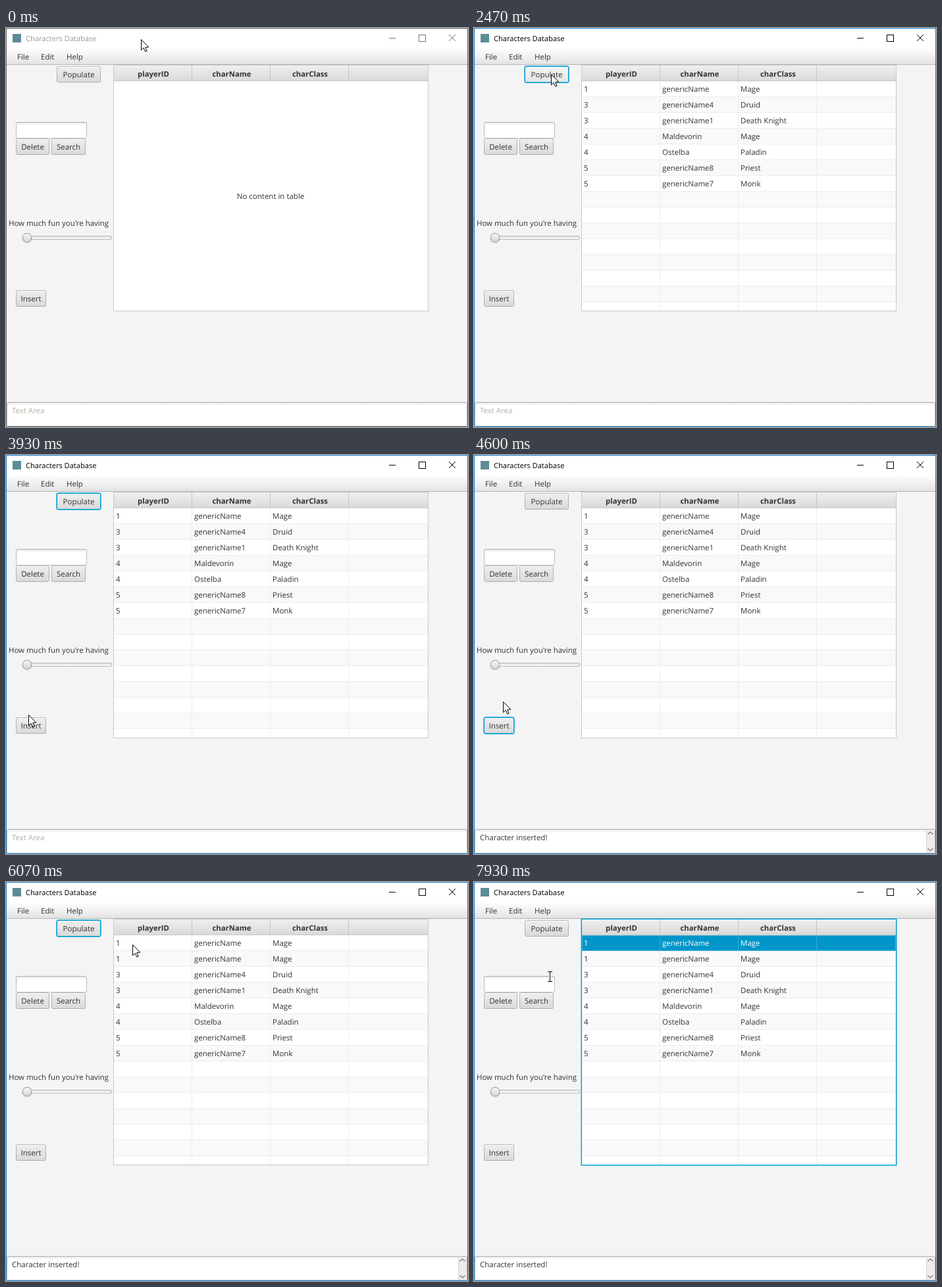
These frames come from a looping animation (702x607 px, 8000 ms). An HTML page with a canvas:

```html
<!DOCTYPE html>
<html lang="en">
<head>
<meta charset="utf-8">
<title>Characters Database</title>
<style>
html, body { margin: 0; width: 100%; height: 100%; overflow: hidden; background: #f4f4f4; }
canvas { display: block; }
</style>
</head>
<body>
<canvas id="stage" width="702" height="607"></canvas>
<script>
const ctx = document.getElementById('stage').getContext('2d');
const LOOP = 8000, TICK = 1000 / 15;
const BLUE = '#039ed3', INK = '#333';

// Ticks at which the state changes
const AT = { press1: 26, fill1: 28, insert: 63, inserted: 65, message: 68, press2: 83, fill2: 84, select: 114 };

// Pointer path: tick, x, y
const PATH = [
  [0, 205, 17], [2, 205, 17], [9, 91, 60], [12, 115, 71], [18, 115, 71], [19, 115, 70],
  [32, 115, 70], [33, 116, 70], [36, 116, 70], [37, 117, 70], [43, 314, 96], [49, 100, 123],
  [56, 28, 355], [59, 34, 395], [62, 36, 411], [67, 36, 411], [77, 117, 68], [79, 119, 75],
  [86, 119, 75], [91, 192, 95], [99, 330, 99], [101, 333, 98], [108, 333, 98], [110, 325, 95],
  [115, 325, 95], [119, 115, 144]
];

const ROWS = [
  ['1', 'genericName', 'Mage'], ['1', 'genericName', 'Mage'], ['3', 'genericName4', 'Druid'],
  ['3', 'genericName1', 'Death Knight'], ['4', 'Maldevorin', 'Mage'], ['4', 'Ostelba', 'Paladin'],
  ['5', 'genericName8', 'Priest'], ['5', 'genericName7', 'Monk']
];
const COLUMNS = [['playerID', 163], ['charName', 282], ['charClass', 401]];
const BUTTONS = {
  Populate: [77, 58, 67, 25], Delete: [15, 168, 51, 25],
  Search: [69, 168, 52, 25], Insert: [15, 399, 46, 25]
};
const FIELD = [15, 143, 108, 25];

function slope(i, axis) {
  if (i < 1 || i >= PATH.length - 1) return 0;
  const rate = j => (PATH[j + 1][axis] - PATH[j][axis]) / (PATH[j + 1][0] - PATH[j][0]);
  const a = rate(i - 1), b = rate(i);
  return a * b > 0 ? 2 * a * b / (a + b) : 0;
}

// Monotone cubic through the path points
function pointerAt(tick) {
  const i = Math.max(0, PATH.findIndex(p => p[0] >= tick) - 1);
  const p = PATH[i], q = PATH[i + 1], span = q[0] - p[0], u = (tick - p[0]) / span;
  return [1, 2].map(axis => Math.round(
    p[axis] + (q[axis] - p[axis]) * u * u * (3 - 2 * u) +
    span * u * (1 - u) * (slope(i, axis) * (1 - u) - slope(i + 1, axis) * u)));
}

const inside = ([px, py], [x, y, w, h]) => px >= x && px < x + w && py >= y && py < y + h;

function fill(x, y, w, h, color) {
  ctx.fillStyle = color;
  ctx.fillRect(x, y, w, h);
}

function outline(x, y, w, h, color, width = 1) {
  ctx.strokeStyle = color;
  ctx.lineWidth = width;
  ctx.strokeRect(x + width / 2, y + width / 2, w - width, h - width);
}

function rounded(x, y, w, h, r, color) {
  ctx.fillStyle = color;
  ctx.beginPath();
  ctx.roundRect(x, y, w, h, r);
  ctx.fill();
}

function line(color, width, ...points) {
  ctx.strokeStyle = color;
  ctx.lineWidth = width;
  ctx.beginPath();
  points.forEach(([x, y]) => ctx.lineTo(x, y));
  ctx.stroke();
}

function shade(y, h, top, bottom) {
  const g = ctx.createLinearGradient(0, y, 0, y + h);
  g.addColorStop(0, top);
  g.addColorStop(1, bottom);
  return g;
}

function text(str, x, y, { color = INK, size = 11.5, weight = 400, align = 'left' } = {}) {
  ctx.font = `${weight} ${size}px "Open Sans", sans-serif`;
  ctx.textRendering = 'geometricPrecision';
  ctx.textAlign = align;
  ctx.fillStyle = color;
  ctx.fillText(str, x, y);
}

function button(label, { focused, hover, pressed }) {
  const [x, y, w, h] = BUTTONS[label];
  if (focused) {
    rounded(x - 1, y - 1, w + 2, h + 2, 4, '#8fd0e8');
    rounded(x - .4, y - .4, w + .8, h + .8, 3.5, BLUE);
  } else {
    rounded(x, y, w, h, 3, shade(y, h, '#bababa', '#a9a9a9'));
  }
  const [top, bottom] = pressed ? ['#cfcfcf', '#c4c4c4'] : hover ? ['#f5f5f5', '#e4e4e4'] : ['#efefef', '#d9d9d9'];
  rounded(x + 1, y + 1, w - 2, h - 2, 2, pressed ? bottom : '#fbfbfb');
  rounded(x + 1, y + 2, w - 2, h - 3, 2, shade(y, h, top, bottom));
  text(label, x + w / 2, y + 17, { align: 'center' });
}

function inputBox(x, y, w, h) {
  rounded(x, y, w, h, 3, shade(y, h, '#b0b0b0', '#c4c4c4'));
  rounded(x + 1, y + 1, w - 2, h - 2, 2, '#fff');
  fill(x + 2, y + 1, w - 4, 4, shade(y + 1, 4, '#e6e6e6', '#fff'));
}

function windowFrame(active) {
  fill(0, 0, 702, 607, '#f4f4f4');
  fill(0, 0, 702, 32, '#fff');
  fill(10, 9, 13, 13, '#5b8d97');
  text('Characters Database', 30, 20, { size: 11.1, color: active ? '#000' : '#999' });
  const ink = active ? '#000' : '#777';
  fill(582, 15, 10, 1, ink);
  outline(627, 10, 11, 11, ink);
  line(ink, 1, [673, 10], [683, 20]);
  line(ink, 1, [683, 10], [673, 20]);
  fill(1, 32, 700, 23, shade(32, 23, '#fdfdfd', '#e3e3e3'));
  fill(1, 55, 700, 1, '#b5b5b5');
  text('File', 17, 48);
  text('Edit', 53, 48);
  text('Help', 92, 48);
}

function slider() {
  text("How much fun you're having", 4, 301, { size: 11.45 });
  rounded(25, 316, 136, 6, 3, '#b8b8b8');
  rounded(26, 317, 134, 4, 2, shade(317, 4, '#e2e2e2', '#fcfcfc'));
  const disc = (y, r, color) => rounded(32 - r, y - r, 2 * r, 2 * r, r, color);
  disc(320, 8, 'rgba(0,0,0,.08)');
  disc(319, 7.2, '#9c9c9c');
  disc(319, 6.2, shade(313, 12, '#f4f4f4', '#d8d8d8'));
}

function table(rows, selected) {
  fill(163, 56, 479, 375, '#c8c8c8');
  fill(164, 57, 477, 23, shade(57, 23, '#efefef', '#dadada'));
  fill(164, 81, 477, 349, '#fff');
  for (const [name, x] of COLUMNS) {
    text(name, x + 61, 74, { size: 11.3, weight: 700, align: 'center' });
    fill(x + 119, 57, 1, 23, '#c4c4c4');
  }
  if (!rows) {
    text('No content in table', 402, 260, { align: 'center' });
  } else {
    for (let i = 0; i < 15; i++) {
      const y = 81 + i * 24, h = Math.min(24, 430 - y), lit = selected && i === 0;
      fill(164, y, 477, h, lit ? '#0096c9' : i % 2 ? '#f9f9f9' : '#fff');
      if (h === 24) fill(164, y + 23, 477, 1, lit ? '#4db6da' : '#ededed');
      COLUMNS.forEach(([, x], c) => {
        fill(x + 119, y, 1, h, lit ? '#33abd4' : '#ededed');
        if (rows[i]) text(rows[i][c], x + 4, y + 16, { color: lit ? '#fff' : INK });
      });
      if (lit) outline(164, y, 477, 24, '#4db6da');
    }
  }
  if (selected) outline(162.5, 55.5, 480, 376, BLUE, 1.5);
}

function textArea(message) {
  inputBox(1, 569, 700, 37);
  if (!message) return text('Text Area', 9, 586, { color: '#b0b0a6' });
  text('Character inserted!', 9, 586);
  fill(687, 571, 13, 34, '#ececec');
  fill(687, 571, 1, 34, '#d4d4d4');
  line('#777', 1.2, [689.5, 577], [693.5, 573.5], [697.5, 577]);
  line('#777', 1.2, [689.5, 598.5], [693.5, 602], [697.5, 598.5]);
}

function arrow(x, y) {
  ctx.beginPath();
  [[0, 0], [0, 16.2], [3.7, 12.8], [6.3, 18.5], [8.7, 17.5], [6.2, 11.9], [11.3, 11.6]]
    .forEach(([dx, dy]) => ctx.lineTo(x + .5 + dx, y + .5 + dy));
  ctx.closePath();
  ctx.fillStyle = '#fff';
  ctx.fill();
  ctx.strokeStyle = '#000';
  ctx.lineWidth = 1;
  ctx.stroke();
}

function beam(x, y) {
  for (const [color, width] of [['#fff', 3], ['#000', 1]]) {
    line(color, width, [x + .5, y - 7], [x + .5, y + 8]);
    for (const end of [y - 7.5, y + 7.5]) line(color, width, [x - 3, end], [x + 4, end]);
  }
}

function draw(tick) {
  const during = (from, to) => tick >= from && tick < to;
  const pointer = pointerAt(tick);
  windowFrame(tick >= AT.press1);
  table(tick < AT.fill1 ? null : ROWS.slice(tick < AT.fill2 ? 1 : 0), tick >= AT.select);
  inputBox(...FIELD);
  slider();

  const focused = {
    Populate: during(AT.press1, AT.insert) || during(AT.press2, AT.select),
    Insert: during(AT.insert, AT.press2)
  };
  const pressed = {
    Populate: during(AT.press1, AT.fill1) || during(AT.press2, AT.fill2),
    Insert: during(AT.insert, AT.inserted)
  };
  for (const label in BUTTONS) {
    button(label, {
      focused: focused[label], pressed: pressed[label], hover: inside(pointer, BUTTONS[label])
    });
  }

  textArea(tick >= AT.message);
  outline(0, 0, 702, 607, tick >= AT.press1 ? '#1883d7' : '#666');
  (inside(pointer, FIELD) ? beam : arrow)(...pointer);
}

function frame() {
  draw(Math.floor((performance.now() % LOOP + 4) / TICK) % 120);
  requestAnimationFrame(frame);
}
frame();
</script>
</body>
</html>
```
